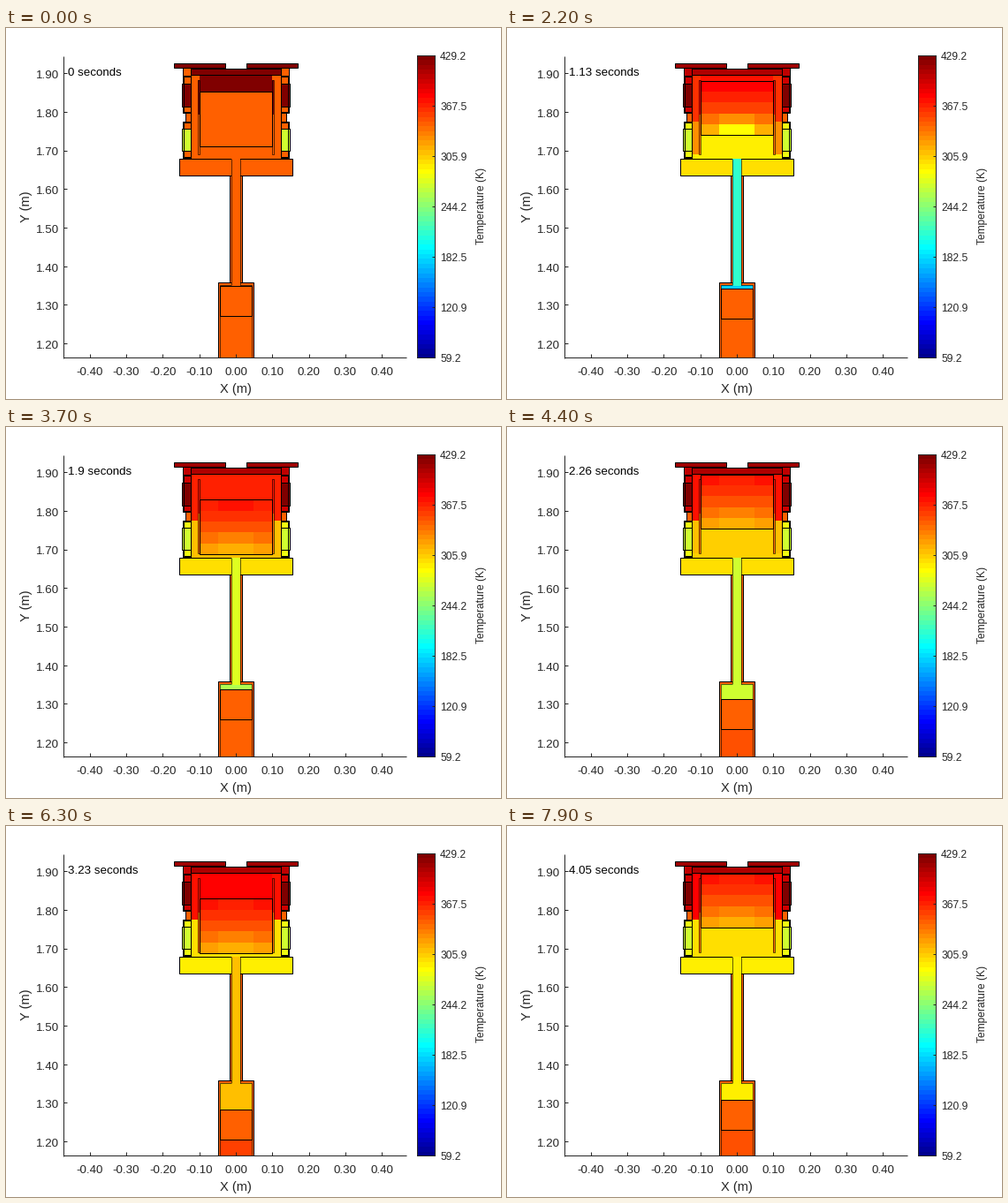
A matplotlib script that plays this animation: 560x420 px, repeating every 8000 ms.

```python
import numpy as np
import matplotlib.pyplot as plt
from matplotlib.animation import FuncAnimation
from matplotlib.patches import Rectangle

W, H, FRAMES = 560, 420, 80
T_MIN, T_MAX = 59.2, 429.2
START = 347
MIRROR = 520
BODY = 61.7  # displacer height
PX = 0.72  # points per pixel at 100 dpi
INK = "#262626"

plt.rcParams["font.family"] = "Liberation Sans"
fig = plt.figure(figsize=(W / 100, H / 100), dpi=100, facecolor="white")
ax = fig.add_axes([0, 0, 1, 1])
ax.axis("off")


def jet(temp):
    """64-step blue-to-red colour for a temperature."""
    r = np.clip(np.floor((temp - T_MIN) / (T_MAX - T_MIN) * 64), 0, 63) + 1
    ramps = ((r - 24, 72 - r), (r - 8, 56 - r), (r + 8, 40 - r))
    return tuple(float(np.clip(min(a, b) / 16, 0, 1)) for a, b in ramps)


def label(x, y, s, size, **kw):
    kw = {"ha": "center", "va": "baseline", "color": INK, **kw}
    return ax.text(x, y, s, fontsize=size * PX, **kw)


def line(x0, y0, x1, y1, color=INK, width=1):
    # snapping centres whole coordinates on their pixel
    ax.plot([x0, x1], [y0, y1], color=color, lw=width * PX,
            solid_capstyle="butt", snap=True)


# ---- axes and colour bar ----
line(65, 32, 65, 374)
line(65, 373, 453, 373)
for i in range(8):
    y = 357 - 43.7 * i
    line(65, y, 69, y)
    label(60, y + 6, f"{1.2 + i / 10:.2f}", 13.33, ha="right")
for i in range(-4, 5):
    x = 260 + 41.3 * i
    line(x, 373, x, 369)
    label(x, 393, f"{i / 10:.2f}", 13.33)
label(260, 413, "X (m)", 14.67)
label(22.5, 202, "Y (m)", 14.67, rotation=90, va="center")

levels = np.linspace(T_MIN, T_MAX, 65)[:64] + 1
ax.imshow([[jet(t)] for t in levels], extent=(465, 486, 374, 31),
          origin="lower", aspect="auto", interpolation="nearest")
ax.add_patch(Rectangle((465, 31), 20, 342, fill=False, ec=INK, lw=PX,
                       snap=True, joinstyle="miter"))
for i in range(7):
    y = 373 - 57 * i
    line(482, y, 485, y)
    label(491, y + 5, f"{T_MIN + i * 370 / 6:.1f}", 12, ha="left")
label(537.5, 201, "Temperature (K)", 12, rotation=90, va="center")
clock = label(69.5, 54, "", 13.33, ha="left", color="black")


# ---- motion ----
def phase(n):
    return np.radians(30.7 * n - 90)


def stroke(n):
    a = phase(n)
    return (np.sin(a) + .08 * np.sin(3 * a)) / .92


def piston_top(n):
    return 307.9 + 15.5 * stroke(n)


def displacer_top(n):
    d = .22 + 1.22 * np.cos(phase(n) + np.radians(3))
    return 68 + 14.25 * np.clip(d, -1, 1)


# ---- temperatures ----
KEYS = (0, 13, 30, 44, 52, 63, 79)


def track(*values, swing=0):
    """Temperature through the key steps plus a cyclic swing."""
    def temp(n):
        wave = np.cos(phase(n) - np.radians(50)) if n else 0
        return np.interp(n, KEYS[:len(values)], values) + swing * wave
    return temp


plate_t = track(429, 412)
head_t = track(429, 402, 410)
shoulder_t = track(START, 400, 404)
heater_t = track(START, 396, 400)
hot_t = track(429, 426)
link_t = track(START)
cooler_t = track(START, 285, 284)
cool_core_t = track(272)
upper_t = track(START, 366, 364, 377, 376, 377, 380)
lower_t = track(START, 344, 315, 308, 305, 302, 297)
gas_hot_t = track(429, 388, 367, 372, 374, 381, 374)
gas_cold_t = track(START, 272, 311, 306, 303, 302, 297)
cold_plate_t = track(START, 301, 300, 297, 295, 295, 293)
pipe_t = track(START, 162, 272, 278, 292, 298, 298, swing=10)
cyl_t = track(START, 129, 235, 277, 288, 300, 298, swing=8)


def bounce_t(n):
    return 352 + 6 * stroke(n)


# ---- machine parts: patch, temperature, optional moving extent ----
parts = []


def box(x0, y0, x1, y1, temp=None, edge=1, span=None):
    p = Rectangle((x0, y0), x1 - x0, y1 - y0, lw=edge * PX,
                  ec="black" if edge else "none", fill=temp is not None,
                  antialiased=bool(edge), snap=True, joinstyle="miter")
    ax.add_patch(p)
    parts.append((p, temp, span))


def pair(x0, y0, x1, y1, temp=None, **kw):
    box(x0, y0, x1, y1, temp, **kw)
    box(MIRROR - x1, y0, MIRROR - x0, y1, temp, **kw)


WALL = .6  # width of the fine inner wall lines

# head and side blocks
pair(200, 45, 209, 54, shoulder_t)
box(209, 46, 311, 53, head_t)
pair(190, 40, 248, 45, plate_t)
pair(200, 54, 209, 96, heater_t)
pair(199, 63, 209, 89, hot_t)
pair(201, 55, 209, 95)
pair(203, 96, 209, 106, link_t)
pair(200, 106, 209, 147, cooler_t)
pair(199, 114, 209, 139, cool_core_t)
pair(201, 107, 209, 146)

# main chamber
box(209, 53, 311, 106, upper_t, edge=0)
box(209, 106, 311, 148, lower_t, edge=0)
box(209, 143, 311, 148, gas_cold_t, edge=0)
box(219, 53, 301, 82, gas_hot_t, edge=0,
    span=lambda n: (53, displacer_top(n)))
box(219, 134, 301, 148, gas_cold_t, edge=0,
    span=lambda n: (displacer_top(n) + BODY, 148))
pair(217, 59, 219, 98, track(429, 385, 372, 376), edge=0)
pair(217, 98, 219, 143, track(START, 345, 338), edge=0)
pair(217, 59, 219, 143, edge=WALL)

# displacer cells, warm at the top
SIDE = ((388, 380, 368, 342, 301), (368, 361, 352, 342, 326),
        (374, 364, 351, 337, 320))
CORE = ((388, 380, 366, 320, 260), (372, 363, 350, 336, 314),
        (371, 365, 352, 335, 314))


def row_span(i):
    return lambda n: (displacer_top(n) + BODY * i / 5,
                      displacer_top(n) + BODY * (i + 1) / 5)


for i in range(5):
    pair(219, 0, 240, 1, track(START, *(s[i] for s in SIDE)),
         edge=0, span=row_span(i))
    box(240, 0, 280, 1, track(START, *(c[i] for c in CORE)),
        edge=0, span=row_span(i))
box(219, 73, 301, 134,
    span=lambda n: (displacer_top(n), displacer_top(n) + BODY))
box(209, 53, 311, 148)

# cold plate, pipe and power cylinder
box(196, 148, 324, 167, cold_plate_t)
box(253, 167, 267, 291, link_t)
box(240, 288, 280, 373, link_t)
box(242, 291, 278, 373, bounce_t, edge=0)
box(242, 291, 278, 300, cyl_t, edge=0,
    span=lambda n: (291, piston_top(n)))
box(242, 291, 278, 325, link_t,
    span=lambda n: (piston_top(n), piston_top(n) + 34))
box(242, 291, 278, 373, edge=WALL)
box(255, 148, 265, 292, pipe_t, edge=0)
for x in (255, 265):
    line(x, 148, x, 291, "black", WALL)
ax.set_xlim(0, W)
ax.set_ylim(H, 0)


def update(n):
    clock.set_text(f"{round(n / 19.5, 2):g} seconds")
    for patch, temp, span in parts:
        if temp:
            patch.set_facecolor(jet(temp(n)))
        if span:
            y0, y1 = (round(v) for v in span(n))
            patch.set_y(y0)
            patch.set_height(y1 - y0)
    return []


anim = FuncAnimation(fig, update, frames=FRAMES, interval=100,
                     repeat=True, repeat_delay=0, blit=False)
plt.show()
```
